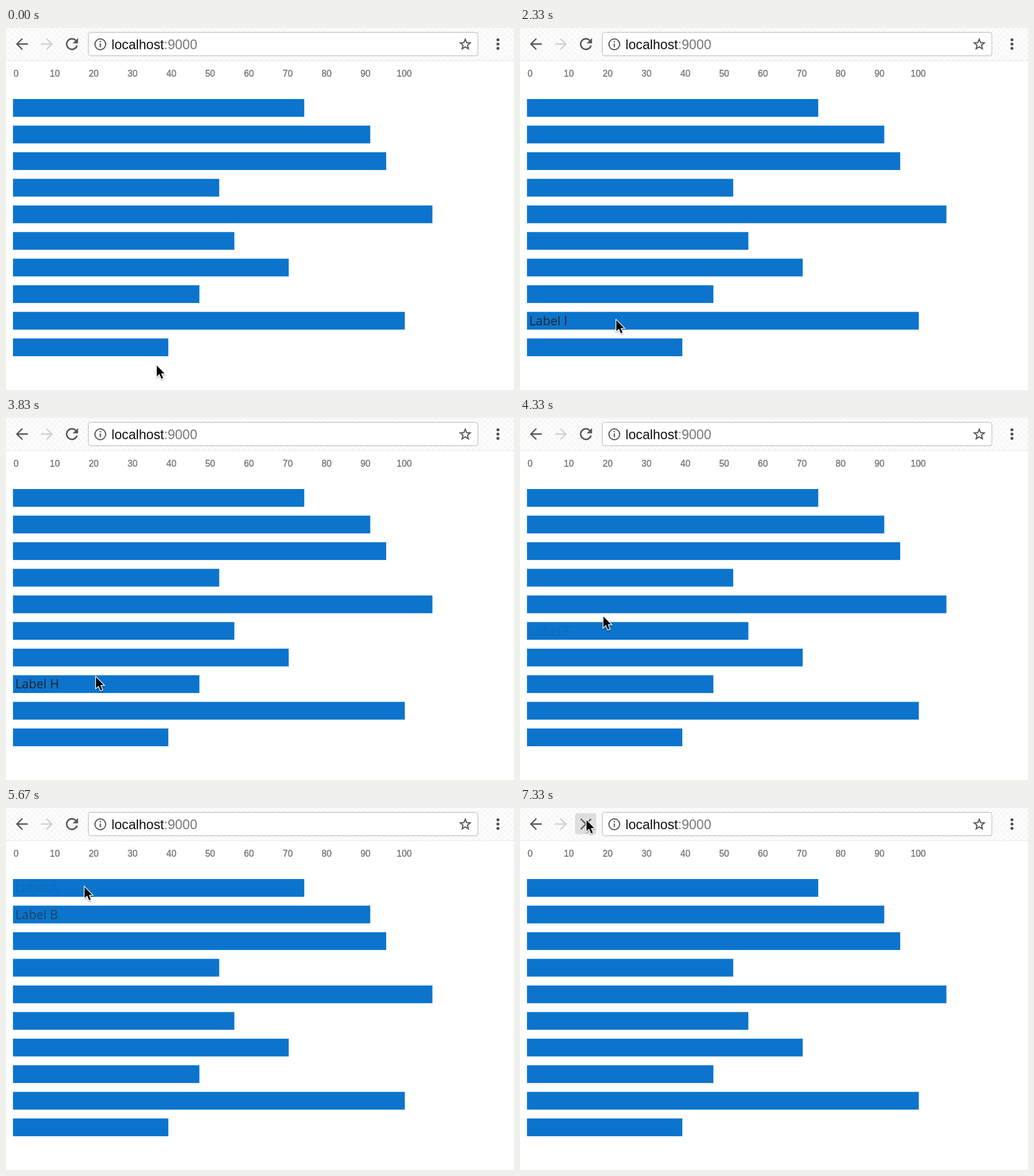
An HTML page that plays this animation: 886x632 px, repeating every 8 s.

```html
<!DOCTYPE html>
<html lang="en">
<head>
<meta charset="utf-8">
<title>Bar chart hover labels</title>
<style>
  html, body { margin: 0; width: 100%; height: 100%; overflow: hidden; background: #fff; }
  svg { display: block; }
  .axis { font: 15.6px "Liberation Sans", Arial, sans-serif; fill: #7b7b7b; stroke: #7b7b7b; stroke-width: .5; text-anchor: middle; }
  .label { font: 21.8px "Open Sans", sans-serif; fill: #222; }
  .url { font: 23.2px "Liberation Sans", Arial, sans-serif; fill: #111; }
  .icon { fill: none; stroke: #555; stroke-width: 2.4; }
</style>
</head>
<body>
<svg width="886" height="632" viewBox="0 0 886 632">
  <defs>
    <pattern id="weave" width="10" height="10" patternUnits="userSpaceOnUse">
      <rect width="10" height="10" fill="#fcfcfc"/>
      <path d="M0 0L10 10M10 0L0 10" stroke="#f0f1f1"/>
    </pattern>
    <filter id="shadow" x="-50%" y="-50%" width="200%" height="200%">
      <feDropShadow dx="0" dy="1.5" stdDeviation="1.3" flood-opacity=".4"/>
    </filter>
  </defs>

  <rect width="886" height="57" fill="url(#weave)"/>
  <rect y="56.5" width="886" height="1" fill="#dfe5e8"/>
  <rect id="button" x="96" y="9" width="37" height="37" rx="4"/>
  <g class="icon">
    <path d="M38 28H19.5M28.5 18.5L19 28L28.5 37.5"/>
    <path d="M61 28H79.5M70.5 18.5L80 28L70.5 37.5" stroke="#d0d0d0"/>
    <g id="reload" transform="translate(115 28)">
      <path d="M8.9 2.6A9.24 9.24 0 1 1 6.5 -6.5" stroke-width="2.6"/>
      <path d="M10.6 -10.6V-1.3H1.3Z" fill="#555" stroke="none"/>
    </g>
    <path id="stop" d="M106 19L124 37M124 19L106 37"/>
  </g>
  <rect x="143.5" y="7.5" width="679.5" height="41" rx="4" fill="#fff" stroke="#b4b4b4"/>
  <g class="icon">
    <circle cx="164.5" cy="28.5" r="9.4" stroke-width="2"/>
    <path d="M164.5 27V33.5M164.5 22.7V25" stroke-width="2.2"/>
    <path id="star" stroke-width="2"/>
  </g>
  <text class="url" x="184" y="37">localhost<tspan fill="#777">:9000</tspan></text>
  <path d="M858 20.5V36" stroke="#505050" stroke-width="5.2" stroke-linecap="round" stroke-dasharray="0 7.5"/>

  <g id="chart"></g>

  <g id="cursor" filter="url(#shadow)">
    <path d="M1 2.2V21.2L5.5 17.1L9 25.2L12 24L8.5 16H14.4Z"
          stroke="#fff" stroke-width="2.5" paint-order="stroke"/>
  </g>
</svg>
<script>
const LOOP = 8000, FRAME = 1000 / 6, FADE = 400;
const LEFT = 12.2, UNIT = 6.773, TOP = 124, ROW = 46.45, BAR_HEIGHT = 31;
const VALUES = [75, 92, 96.1, 53.1, 108, 57, 71, 48, 100.9, 40];

// Pointer stops: time, x, y
const STOPS = [
  [0, 262, 587], [1500, 212, 552], [2330, 167, 508], [3830, 156, 451],
  [4570, 139, 294], [4760, 136, 262], [4830, 135, 223], [5500, 135, 178],
  [5670, 136, 135], [7000, 128, 47], [7330, 115, 19]
];

const $ = id => document.getElementById(id);

function add(tag, attributes, text = "") {
  const node = document.createElementNS("http://www.w3.org/2000/svg", tag);
  for (const name in attributes) node.setAttribute(name, attributes[name]);
  node.textContent = text;
  return $("chart").appendChild(node);
}

const starPoints = Array.from({ length: 10 }, (_, i) => {
  const radius = i % 2 ? 4.1 : 9.2, angle = i * Math.PI / 5;
  return [801 + radius * Math.sin(angle), 28.8 - radius * Math.cos(angle)];
});
$("star").setAttribute("d", "M" + starPoints.join("L") + "Z");

for (let i = 0; i <= 10; i++) add("text", { class: "axis", x: 17.6 + 67.7 * i, y: 85 }, i * 10);

const labels = VALUES.map((value, i) => {
  const y = TOP + ROW * i;
  add("rect", { x: LEFT, y, width: value * UNIT, height: BAR_HEIGHT, fill: "#0c74cc" });
  return add("text", { class: "label", x: 16.3, y: y + 23.3 }, "Label " + "ABCDEFGHIJ"[i]);
});

function pointerAt(t) {
  const next = STOPS.findIndex(stop => stop[0] > t);
  if (next < 0) return STOPS.at(-1).slice(1);
  const [t0, x0, y0] = STOPS[next - 1], [t1, x1, y1] = STOPS[next];
  const p = (t - t0) / (t1 - t0);
  return [x0 + (x1 - x0) * p, y0 + (y1 - y0) * p];
}

// Each label fades in while its bar is hovered and out afterwards.
function labelLevels(t) {
  const step = 10, levels = VALUES.map(() => 0);
  for (let s = 0; s < t; s += step) {
    const y = pointerAt(s)[1];
    levels.forEach((level, i) => {
      const offset = y - TOP - ROW * i;
      const change = offset >= 0 && offset < BAR_HEIGHT ? step : -step;
      levels[i] = Math.min(1, Math.max(0, level + change / FADE));
    });
  }
  return levels;
}

function draw(t) {
  const [x, y] = pointerAt(t);
  const hovering = x > 96 && x < 133 && y < 46, loading = t > 7300;
  $("cursor").setAttribute("transform", `translate(${x} ${y})`);
  $("button").setAttribute("fill", loading ? "#dedede" : hovering ? "#e8e8e8" : "none");
  $("reload").style.display = loading ? "none" : "";
  $("stop").style.display = loading ? "" : "none";
  labelLevels(t).forEach((level, i) => {
    labels[i].setAttribute("opacity", level * level * (3 - 2 * level));
  });
}

let shown = -1;
function tick() {
  const frame = Math.floor((performance.now() % LOOP + 3.4) / FRAME) % 48;
  if (frame !== shown) draw((shown = frame) * FRAME);
  requestAnimationFrame(tick);
}
tick();
</script>
</body>
</html>
```
